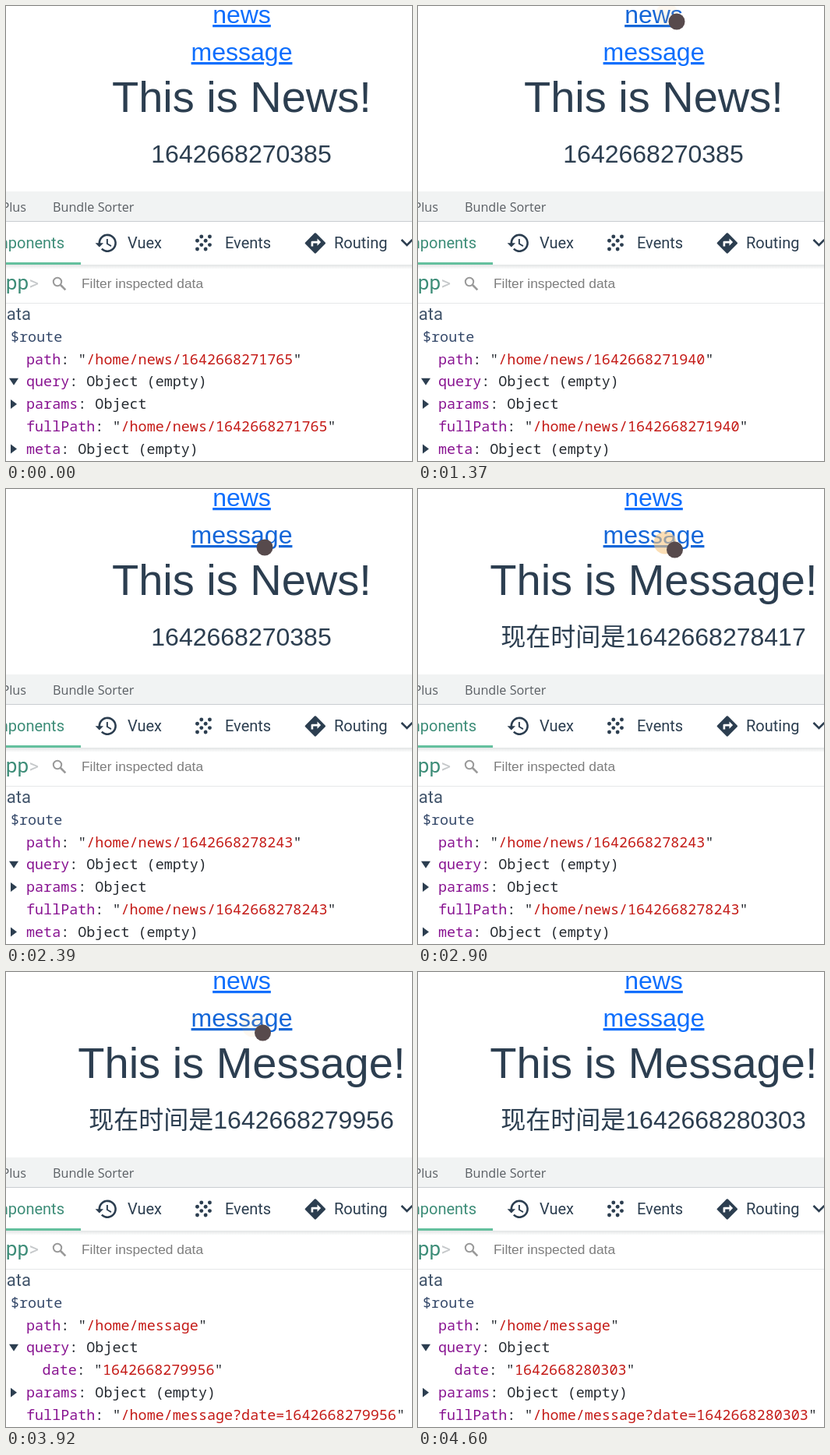
Write an HTML page that moves like this. It is 521 by 584 pixels and loops after 5.11 s.

```html
<!DOCTYPE html>
<html lang="en">
<head>
<meta charset="utf-8">
<title>Route inspector</title>
<style>
  html, body { margin: 0; width: 100%; height: 100%; overflow: hidden; background: #fff; }
  svg { display: block; width: 521px; height: 584px; fill: #2c3e50; }
  text { white-space: pre; }
  .page { font: 32px "Liberation Sans", "Noto Sans CJK SC", "Noto Sans CJK", sans-serif; text-anchor: middle; }
  .page .title { font-size: 56px; }
  .link { fill: #0d6efd; text-decoration: underline; }
  .link.hover { fill: #1366d8; }
  .browser { font: 16.2px "Open Sans", "Noto Sans", sans-serif; fill: #5a5f64; }
  .tools { font: 20px Roboto, sans-serif; }
  .active { fill: #3d8d78; }
  .end { text-anchor: end; }
  .mono { font: 18.42px "Noto Sans Mono", "DejaVu Sans Mono", monospace; }
  .mono text { fill: #252a30; }
  .key { fill: #881391; }
  .str { fill: #c41a16; }
</style>
</head>
<body>
<svg viewBox="0 0 521 584">
  <defs>
    <linearGradient id="shade" x2="0" y2="1">
      <stop stop-color="#e2e4e5"/>
      <stop offset="1" stop-color="#fff"/>
    </linearGradient>
  </defs>

  <g class="page">
    <text id="news" class="link" x="302.5" y="22">news</text>
    <text id="message" class="link" x="302.5" y="70">message</text>
    <text id="title" class="title" x="302.4" y="136"></text>
    <text id="stamp" x="302" y="201"></text>
  </g>

  <rect y="238" width="521" height="38" fill="#f1f3f3"/>
  <rect y="276" width="521" height="1" fill="#cacdd1"/>
  <g class="browser">
    <text class="end" x="26" y="264">Plus</text>
    <text x="60" y="264">Bundle Sorter</text>
  </g>

  <g class="tools">
    <text class="active end" x="75" y="311">Components</text>
    <text x="156" y="311">Vuex</text>
    <text x="281" y="311">Events</text>
    <text x="421" y="311">Routing</text>
    <rect y="332" width="521" height="6" fill="url(#shade)"/>
    <rect y="329" width="96" height="3" fill="#64c09e"/>
    <text class="active end" x="29" y="364" font-size="26">App</text>
    <text x="29.5" y="364" font-size="24" fill="#c5c8ca">&gt;</text>
    <text class="end" x="32" y="403" font-size="22" fill="#43566c">data</text>
  </g>

  <!-- history, grain, directions, chevron, search -->
  <path transform="translate(113.3 288.7) scale(1.3)" d="M13 3a9 9 0 0 0-9 9H1l4 4 4-4H6a7 7 0 1 1 2.06 4.94l-1.42 1.42A9 9 0 1 0 13 3zM12 8v5l4.28 2.54.72-1.21-3.5-2.08V8z"/>
  <g id="grain" transform="translate(237.5 288) scale(1.33)"></g>
  <path transform="translate(381 288.6) scale(1.32)" fill-rule="evenodd" d="M21.71 11.29l-9-9a1 1 0 0 0-1.41 0l-9 9a1 1 0 0 0 0 1.41l9 9a1 1 0 0 0 1.41 0l9-9a1 1 0 0 0 0-1.41zM14 14.5V12h-4v3H8v-4a1 1 0 0 1 1-1h5V7.5l3.5 3.5z"/>
  <path d="M507.5 300l7 7 7-7" fill="none" stroke="#2c3e50" stroke-width="2.6"/>
  <g fill="none" stroke="#999" stroke-width="2">
    <circle cx="66" cy="354" r="5.2"/>
    <path d="M70 358l6.3 6.3" stroke-width="2.6"/>
  </g>
  <text x="97" y="362" style="font:17.33px 'Liberation Sans',sans-serif" fill="#7d7d7d">Filter inspected data</text>
  <rect y="381" width="521" height="1" fill="#e6e8e9"/>

  <g class="mono">
    <text x="6" y="431" style="fill:#35496a">$route</text>
    <g id="panel"></g>
  </g>

  <circle id="press" r="14.5" fill="#f8c884"/>
  <circle id="pointer" r="10.5" fill="#574a4c"/>
</svg>
<script>
const LOOP = 5110;
const $ = id => document.getElementById(id);

$('grain').innerHTML = [[10, 6], [18, 6], [6, 10], [14, 10], [10, 14], [18, 14], [6, 18], [14, 18]]
  .map(([x, y]) => `<circle cx="${x}" cy="${y}" r="1.85"/>`).join('');

// Each entry: [start time, value], held until the next one.
const at = (track, t) => track.reduce((v, [start, next]) => t >= start ? next : v, null);

// Last six digits of the timestamps.
const routes = [[0, '271765'], [1370, '271940'], [1710, '278243'], [3070, '278417'],
  [3240, '279152'], [3410, '279332'], [3580, '279536'], [3750, '279740'],
  [3920, '279956'], [4090, '280126'], [4260, '280303']];
const presses = [[0, 0], [1370, .12], [1540, .6], [1710, 0], [2560, .6], [3410, .12],
  [3580, .6], [3920, .12], [4090, .6], [4260, 0]];
const hovers = [[0, ''], [1030, 'news'], [2050, ''], [2220, 'message'], [4430, '']];

const home = [332, 20];
const entry = [170, 340, 510, 680, 850, 1030].map((time, i) => {
  const rest = (1 - i / 5) ** 2;
  return [time, [home[0] + 68 * rest, home[1] + 458 * rest]];
});
const moves = [[0, null], ...entry, [2050, [332, 38]], [2220, [332, 62]],
  [2390, [332, 75]], [2560, [329.5, 78]], [4430, [391, 284]], [4600, null]];

function line(row, indent, key, value, arrow) {
  const x = 26 + 20.6 * indent, y = 459.6 + 28.75 * row;
  const shown = value[0] === '"'
    ? `"<tspan class="str">${value.slice(1, -1)}</tspan>"` : value;
  const mark = { open: `M4 ${y - 10.7}h12l-6 9z`, shut: `M6 ${y - 12.2}v12l8-6z` }[arrow];
  return (mark ? `<path d="${mark}"/>` : '') +
    `<text x="${x}" y="${y}"><tspan class="key">${key}</tspan>: ${shown}</text>`;
}

function newsPanel(date) {
  const path = `"/home/news/${date}"`;
  return line(0, 0, 'path', path) +
    line(1, 0, 'query', 'Object (empty)', 'open') +
    line(2, 0, 'params', 'Object', 'shut') +
    line(3, 0, 'fullPath', path) +
    line(4, 0, 'meta', 'Object (empty)', 'shut');
}

function messagePanel(date) {
  return line(0, 0, 'path', '"/home/message"') +
    line(1, 0, 'query', 'Object', 'open') +
    line(2, 1, 'date', `"${date}"`) +
    line(3, 0, 'params', 'Object (empty)', 'shut') +
    line(4, 0, 'fullPath', `"/home/message?date=${date}"`);
}

function setText(id, text) {
  if ($(id).textContent !== text) $(id).textContent = text;
}

let shownRoute;
function draw(now) {
  const t = now % LOOP;
  const route = at(routes, t), date = '1642668' + route;

  if (route !== shownRoute) {
    $('panel').innerHTML = (t < 3070 ? newsPanel : messagePanel)(date);
    shownRoute = route;
  }

  const onNews = t < 2900;
  setText('title', onNews ? 'This is News!' : 'This is Message!');
  setText('stamp', onNews ? '1642668270385'
    : '现在时间是' + (t < 3070 ? '1642668278417' : date));

  for (const id of ['news', 'message']) $(id).classList.toggle('hover', at(hovers, t) === id);

  const spot = at(moves, t);
  $('pointer').setAttribute('visibility', spot ? 'visible' : 'hidden');
  if (spot) {
    $('pointer').setAttribute('transform', `translate(${spot})`);
    $('press').setAttribute('transform', `translate(${spot[0] - 12.5} ${spot[1] - 9})`);
  }
  $('press').setAttribute('opacity', at(presses, t));
}

let start;
function tick(now) {
  start ??= now;
  draw(now - start);
  requestAnimationFrame(tick);
}
draw(0);
requestAnimationFrame(tick);
</script>
</body>
</html>
```
